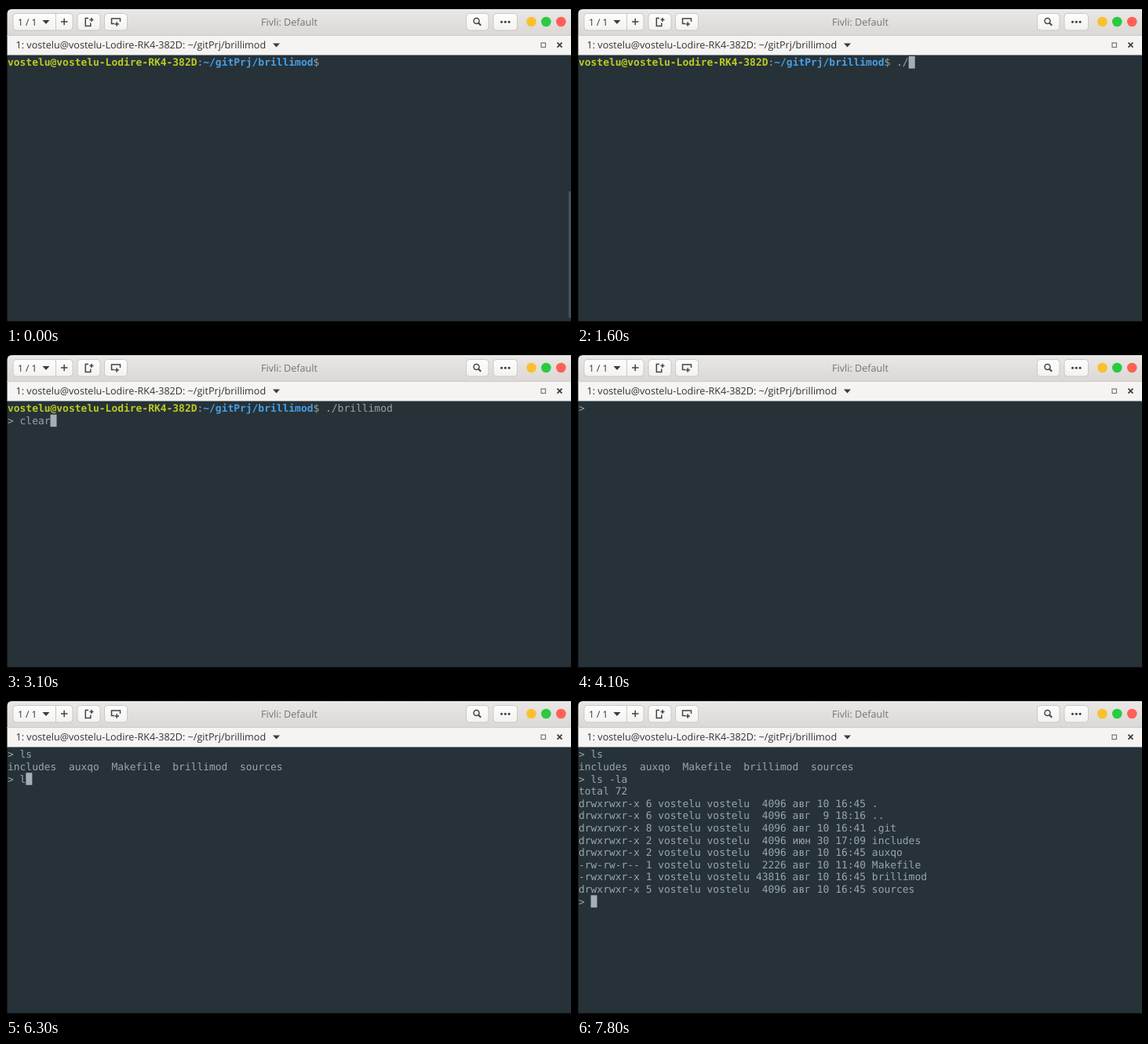
Animation of 720 by 405 pixels, one loop 8 s. Source, as an HTML page:

```html
<!DOCTYPE html>
<html lang="en">
<head>
<meta charset="utf-8">
<title>Terminal session</title>
<style>
  html, body { margin: 0; width: 100%; height: 100%; overflow: hidden; background: #000; }
  svg { display: block; }
  text { text-rendering: geometricPrecision; white-space: pre; }
  .ui { font: 12.6px "Open Sans", "Noto Sans", sans-serif; fill: #333; }
  .button { fill: url(#face); stroke: #cbc8c4; }
  .icon { fill: none; stroke: #444; stroke-width: 1.5; }
  .solid { fill: #3c3c3c; }
  #lines { font: 12.94px "DejaVu Sans Mono", monospace; fill: #98a5ab; }
  .user { font-weight: bold; fill: #bccb22; }
  .path { font-weight: bold; fill: #489fe6; }
</style>
</head>
<body>
<svg width="720" height="405" viewBox="0 0 720 405">
  <defs>
    <linearGradient id="bar" x2="0" y2="1">
      <stop stop-color="#eae8e6"/><stop offset="1" stop-color="#dad7d4"/>
    </linearGradient>
    <linearGradient id="face" x2="0" y2="1">
      <stop stop-color="#fdfdfd"/><stop offset="1" stop-color="#f3f2f1"/>
    </linearGradient>
  </defs>

  <!-- title bar -->
  <path d="M1.5 37.5V10q0-6 6-6H720V37.5z" fill="url(#bar)"/>
  <rect class="button" x="9" y="9.5" width="76" height="21.5" rx="4"/>
  <path d="M63.5 10V31" stroke="#cbc8c4"/>
  <rect class="button" x="91" y="9.5" width="29" height="21.5" rx="4"/>
  <rect class="button" x="125.5" y="9.5" width="29" height="21.5" rx="4"/>
  <rect class="button" x="586.5" y="9.5" width="28.500" height="21.5" rx="4"/>
  <rect class="button" x="621" y="9.5" width="30.5" height="21.5" rx="4"/>
  <text class="ui" x="15" y="24.5" style="font-size:12px">1 / 1</text>
  <path class="solid" d="M46.500 18h9l-4.500 5z"/>
  <path class="icon" d="M70 20h8.500M74.200 15.800v8.500" stroke-width="1.800"/>
  <path class="icon" d="M105 15.500h-3.700v10h6.500v-4M106.500 17.500h5M109 15v5"/>
  <path class="icon" d="M138 22.500h-3.500v-6.500h11v4M138.500 23h5.500M141.200 20.200v5.500"/>
  <circle class="icon" cx="599.500" cy="19" r="3.500"/>
  <path class="icon" d="M602 21.500l3.200 3.200" style="stroke-width:2"/>
  <g class="solid">
    <circle cx="631.500" cy="20.300" r="1.500"/>
    <circle cx="636.300" cy="20.300" r="1.500"/>
    <circle cx="641.100" cy="20.300" r="1.500"/>
  </g>
  <circle cx="669.500" cy="20" r="6.300" fill="#fbc02d"/>
  <circle cx="688.300" cy="20" r="6.300" fill="#28cb42"/>
  <circle cx="707.300" cy="20" r="6.300" fill="#ff6058"/>
  <text class="ui" x="361" y="24.500" text-anchor="middle" style="fill:#77736f">Fivli: Default</text>

  <!-- tab bar -->
  <rect x="1.500" y="37" width="718.500" height="26" fill="#f5f4f3"/>
  <rect x="1.500" y="37" width="718.500" height="1" fill="#cfccc9"/>
  <text class="ui" id="tab" x="12.500" y="54"></text>
  <path class="solid" d="M340 47.500h9l-4.500 5z"/>
  <rect class="icon" x="682" y="47" width="5.500" height="5.500" style="stroke:#777;stroke-width:1.200"/>
  <path class="icon" d="M702.500 46.700l6 6m0-6l-6 6" style="stroke-width:1.900"/>

  <!-- terminal -->
  <rect x="1.500" y="62.500" width="718.500" height="339" fill="#263238"/>
  <rect id="scroll" x="717" y="236" width="3" height="161" fill="#46535a"/>
  <g id="lines"></g>
  <rect id="cursor" width="8" height="15.600" fill="#a3afb5"/>
</svg>
<script>
const LOOP = 8000, BLINK = 300;
const LEFT = 2, TOP = 64, CELL = 7.79, ROW = 15.6, BASE = 12.4;
const user = 'vostelu', app = 'brillimod', lib = 'auxqo';
const login = `${user}@${user}-Lodire-RK4-382D`, dir = `~/gitPrj/${app}`;

const entry = (mode, links, size, date, name) =>
  `${mode} ${links} ${user} ${user} ${String(size).padStart(5)} ${date} ${name}\n`;
const folder = (links, date, name) => entry('drwxrwxr-x', links, 4096, date, name);

const listing = 'total 72\n' +
  folder(6, 'авг 10 16:45', '.') +
  folder(6, 'авг  9 18:16', '..') +
  folder(8, 'авг 10 16:41', '.git') +
  folder(2, 'июн 30 17:09', 'includes') +
  folder(2, 'авг 10 16:45', lib) +
  entry('-rw-rw-r--', 1, 2226, 'авг 10 11:40', 'Makefile') +
  entry('-rwxrwxr-x', 1, 43816, 'авг 10 16:45', app) +
  folder(5, 'авг 10 16:45', 'sources');

// Terminal output by time; \b erases a character, \f clears the screen.
const output = [
  [-400, `${login}:${dir}$ `],
  [1100, '.'], [1300, '/'], [1400, 'n'], [1600, '\b'],
  [1900, app[0]], [2000, app.slice(1) + ' '], [2200, '\n> '],
  [2700, 'c'], [2800, 'l'], [2900, 'e'], [3000, 'a'], [3100, 'r'], [3200, '\f> '],
  [5500, 'l'], [5800, 's'],
  [6000, `\nincludes  ${lib}  Makefile  ${app}  sources\n> `],
  [6300, 'l'], [6400, 's'], [6500, ' '],
  [6800, '-'], [6900, 'l'], [7000, 'a'], [7200, `\n${listing}> `],
];

const get = id => document.getElementById(id);
const lines = get('lines'), cursor = get('cursor'), scroll = get('scroll');
get('tab').textContent = `1: ${login}: ${dir}`;

const paint = line => line
  .replace(login, `<tspan class="user">${login}</tspan>`)
  .replace(dir, `<tspan class="path">${dir}</tspan>`);

function write(screen, text) {
  if (text === '\b') return screen.slice(0, -1);
  return text[0] === '\f' ? text.slice(1) : screen + text;
}

let shown = '';
function draw(t) {
  const past = output.filter(([at]) => at <= t);
  const screen = past.reduce((s, [, text]) => write(s, text), '');
  const rows = screen.split('\n'), last = rows.length - 1;
  if (screen !== shown) {
    lines.innerHTML = rows.map((line, i) =>
      `<text x="${LEFT}" y="${TOP + BASE + i * ROW}">${paint(line)}</text>`).join('');
    shown = screen;
  }
  const idle = t - past[past.length - 1][0];
  cursor.setAttribute('x', LEFT + rows[last].length * CELL);
  cursor.setAttribute('y', TOP + last * ROW);
  cursor.setAttribute('opacity', Math.floor(idle / BLINK) % 2 ? 0 : 1);
  // The scrollbar fades out in three steps from 400 to 600 ms.
  const step = Math.floor(t / 100) - 3;
  scroll.setAttribute('opacity', 1 - Math.min(3, Math.max(0, step)) / 3);
}

function frame() {
  draw(performance.now() % LOOP);
  requestAnimationFrame(frame);
}
frame();
</script>
</body>
</html>
```
